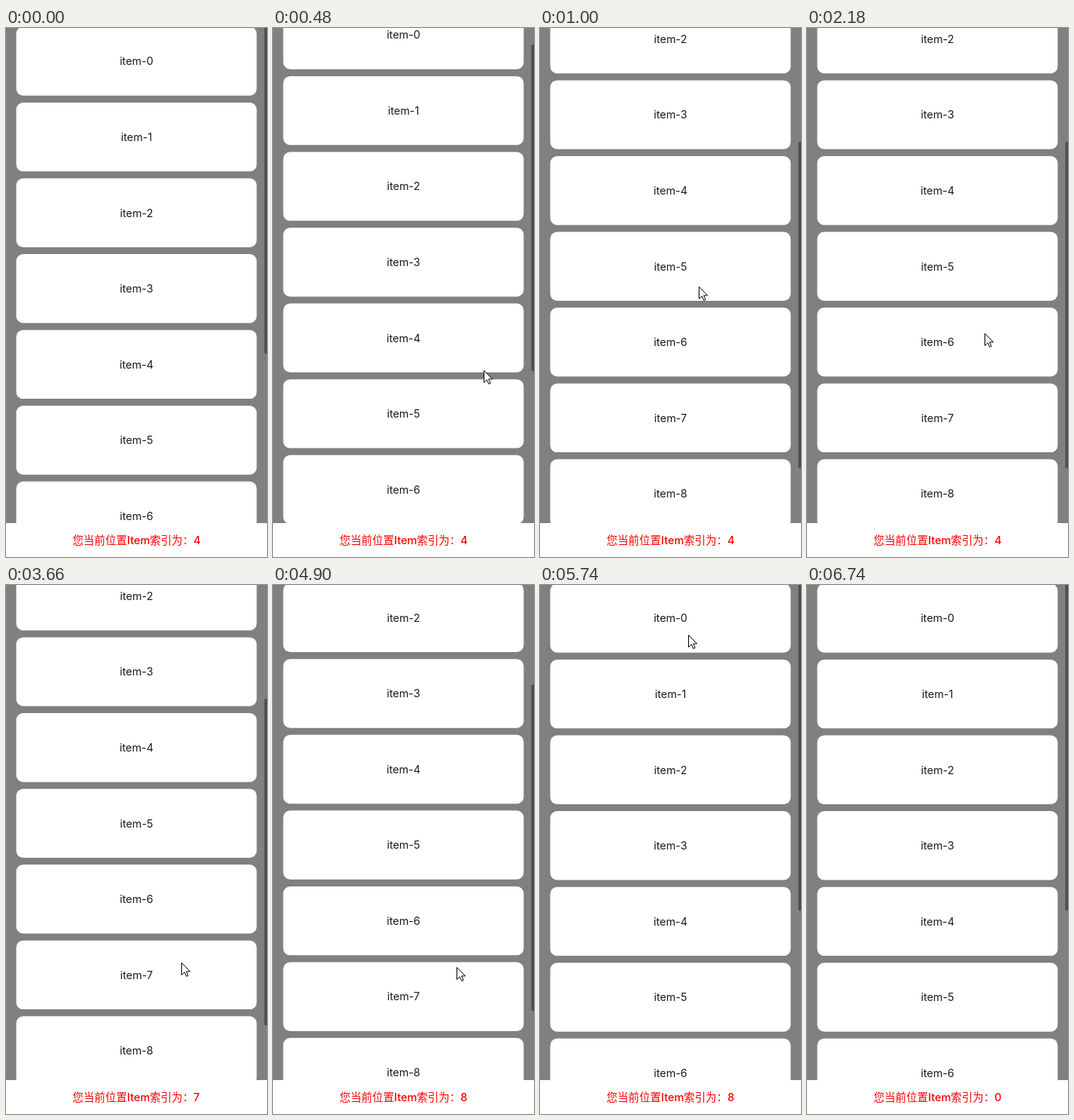
Animation of 347x702 px, one loop 7.4 s. Source, as an HTML page:

```html
<!DOCTYPE html>
<html lang="zh">
<head>
<meta charset="utf-8">
<title>List index</title>
<style>
  html, body { margin: 0; width: 100%; height: 100%; overflow: hidden; background: #fff; }
  svg { display: block; }
  text {
    font: 14.4px Inter, "Noto Sans CJK SC", "Noto Sans CJK", sans-serif;
    text-anchor: middle;
    fill: #1a1a1a;
  }
  #status { font-size: 14.5px; font-weight: 500; text-anchor: start; fill: #f00; }
</style>
</head>
<body>
<svg width="347" height="702" viewBox="0 0 347 702">
  <rect width="347" height="657" fill="#808080"/>
  <g id="list"></g>
  <rect id="thumb" x="343.5" width="6" rx="1.8" fill="#4d4d4d"/>
  <rect y="657" width="347" height="45" fill="#fff"/>
  <text id="status" x="88.5" y="684.6"></text>
  <path id="cursor" d="M.5 .5V16.5L4.3 12.8L6.8 18.4L9.2 17.4L6.7 11.9H11.7Z"
        fill="#fff" stroke="#000" stroke-width="1"/>
</svg>
<script>
const LOOP = 7400, STEP = 40;
const COUNT = 10, PITCH = 100.57, CARD_H = 91.4, TOP = -1.6, VIEW_H = 657;
const RATIO = VIEW_H / (COUNT * PITCH - (PITCH - CARD_H));
const FIRST_INDEX = 4, CLICKS = [2680, 3660, 4500, 5940];
const ENTER = 80, LEAVE = 6740;

const move = (start, time, to, power = 1) => ({ start, time, to, power });

const scrollMoves = [
  move(440, 360, [230.7], 1.4),
  move(4860, 440, [0], 1.4)
];
const cursorMoves = [
  move(40, 240, [280, 454]),
  move(480, 320, [270, 455]),
  move(800, 200, [211, 343]),
  move(1000, 120, [199, 276]),
  move(1280, 240, [189, 248]),
  move(1980, 200, [236, 405]),
  move(2930, 440, [233, 501]),
  move(3740, 600, [246, 608]),
  move(4540, 200, [244, 507]),
  move(5220, 520, [197, 66], 3),
  move(5980, 720, [36, 629])
];

const $ = id => document.getElementById(id);
const list = $("list"), thumb = $("thumb"), status = $("status"), cursor = $("cursor");

function follow(moves, from, t) {
  return moves.reduce((pos, { start, time, to, power }) => {
    const elapsed = Math.floor((t - start) / STEP) * STEP;
    const k = Math.min(1, Math.max(0, elapsed / time));
    const eased = 1 - (1 - k) ** power;
    return pos.map((v, i) => v + (to[i] - v) * eased);
  }, from);
}

const scrollAt = t => follow(scrollMoves, [0], t)[0];
const cursorAt = t => follow(cursorMoves, [345, 515], t).map(Math.round);

// The item under the pointer at the latest click
function indexAt(t) {
  const click = CLICKS.findLast(c => c <= t);
  if (click === undefined) return FIRST_INDEX;
  return Math.floor((cursorAt(click)[1] + scrollAt(click) - TOP) / PITCH);
}

function add(tag, attrs, label = "") {
  const el = document.createElementNS("http://www.w3.org/2000/svg", tag);
  for (const name in attrs) el.setAttribute(name, attrs[name]);
  el.textContent = label;
  list.append(el);
}

for (let i = 0; i < COUNT; i++) {
  const y = TOP + i * PITCH;
  add("rect", { x: 13.6, y, width: 319.7, height: CARD_H, rx: 9.2, fill: "#fff" });
  add("text", { x: 173.5, y: y + 51 }, "item-" + i);
}
thumb.setAttribute("height", VIEW_H * RATIO);

function draw(t) {
  const scroll = scrollAt(t);
  list.setAttribute("transform", `translate(0 ${-scroll})`);
  thumb.setAttribute("y", scroll * RATIO - 1);
  cursor.setAttribute("transform", `translate(${cursorAt(t)})`);
  cursor.setAttribute("visibility", t >= ENTER && t < LEAVE ? "visible" : "hidden");
  const label = "您当前位置Item索引为：" + indexAt(t);
  if (status.textContent !== label) status.textContent = label;
}

const start = performance.now();
function tick() {
  draw((performance.now() - start) % LOOP);
  requestAnimationFrame(tick);
}
tick();
</script>
</body>
</html>
```
